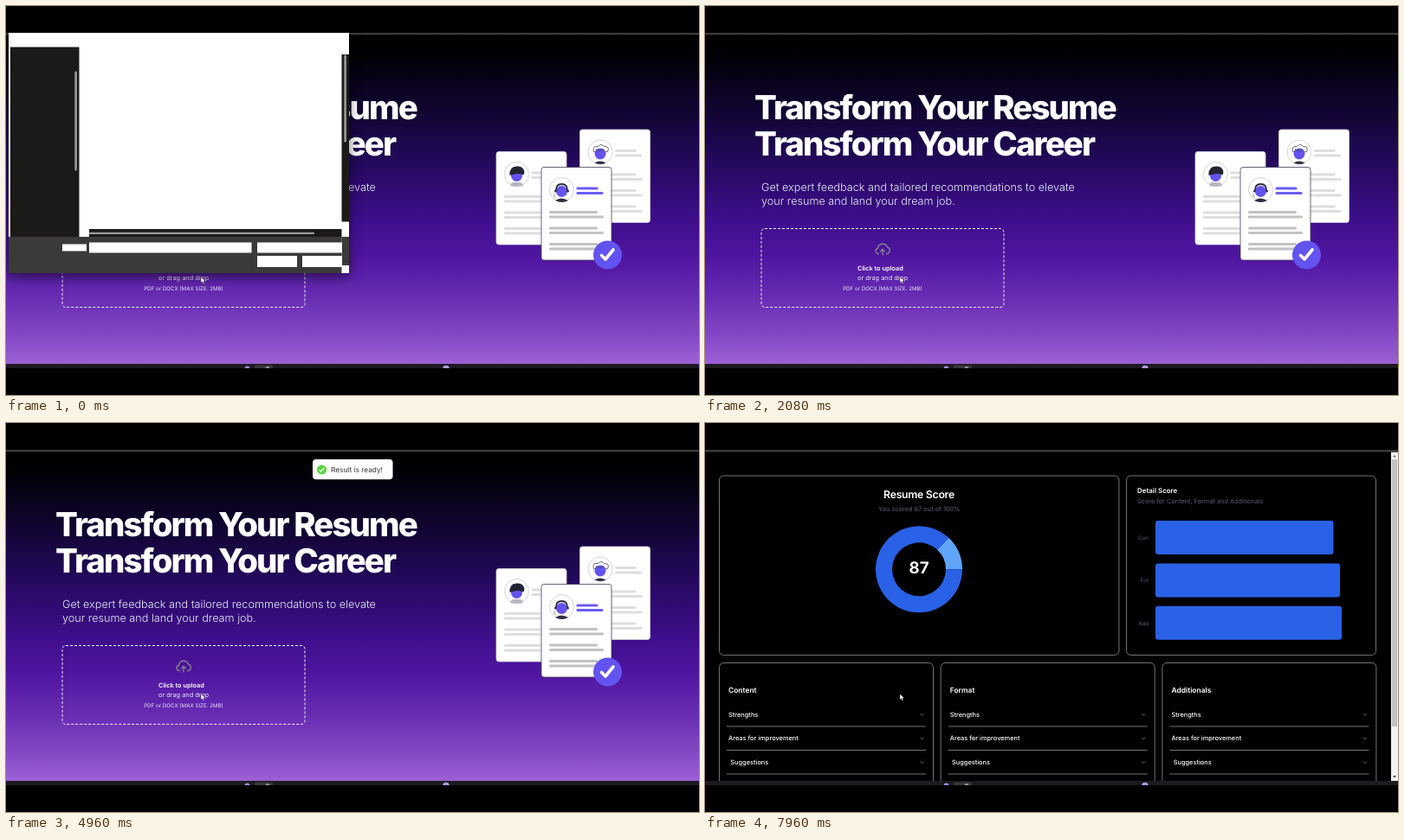
An HTML page that plays this animation: 800 px wide and 450 px high, repeating every 8000 ms.

```html
<!DOCTYPE html>
<html lang="en">
<head>
<meta charset="utf-8">
<title>Resume upload and score</title>
<style>
  html, body { margin: 0; width: 100%; height: 100%; overflow: hidden; background: #000; }
  svg { display: block; width: 100vw; height: 100vh; }
  text { font-family: Inter, sans-serif; text-rendering: geometricPrecision; white-space: pre; }
  .dialog text { font-family: "Open Sans", "Noto Sans", sans-serif; }
  .dialog { filter: drop-shadow(0 4px 7px rgba(0, 0, 0, .55)); }
</style>
</head>
<body>
<svg id="stage" viewBox="0 0 800 450"></svg>
<script>
const LOOP = 8000;
const LOADED = 120, CLOSED = 2080, TOAST = 2120, READY = 3520, SCORE = 5000;
const BARS = 5017, PIE = 5420;
const TYPED = [[0, ''], [1080, 'M'], [1240, 'Mu'],
  [1640, 'Muvek - New Resume 2024.docx'], [1800, 'Muvek - New Resume 2024.pdf']];

// Drawing helpers
const rect = (x, y, w, h, fill, more = '') =>
  `<rect x="${x}" y="${y}" width="${w}" height="${h}" fill="${fill}" ${more}/>`;
const box = (x, y, w, h, fill, stroke, r = 1) =>
  rect(x, y, w, h, fill, `rx="${r}" stroke="${stroke}" stroke-width=".8"`);
const disc = (x, y, r, fill, more = '') => `<circle cx="${x}" cy="${y}" r="${r}" fill="${fill}" ${more}/>`;
const line = (d, stroke, width = 1, more = '') =>
  `<path d="${d}" fill="none" stroke="${stroke}" stroke-width="${width}" ${more}/>`;
const shape = (d, fill) => `<path d="${d}" fill="${fill}"/>`;
const text = (x, y, s, size, fill = '#fff', weight = 400, more = '') =>
  `<text x="${x}" y="${y}" font-size="${size}" fill="${fill}" font-weight="${weight}" ${more}>${s}</text>`;
const group = (id, content, more = '') => `<g id="${id}" ${more}>${content}</g>`;
const middle = 'text-anchor="middle"';
const round = 'stroke-linecap="round" stroke-linejoin="round"';
const chevron = (x, y, color, s = 2) => line(`M${x - s} ${y - s / 2}l${s} ${s} ${s} ${-s}`, color, .8);

// Landing page
function resumeCard(dx, dy, front, portrait) {
  const rows = [238.5, 257, 275.5].map(y =>
    line(`M628.5 ${y}h53M628.5 ${y + 5.5}h60`, front ? '#c2c2c2' : '#dedede', 3.2, round)).join('');
  return `<g transform="translate(${dx} ${dy})">
    ${box(618, 186.5, 81, 107.5, '#fff', front ? '#3f3d56' : '#d5d2dc', 3)}
    ${disc(641.5, 212.5, 14, '#fff', 'stroke="#c9c9cf" stroke-width=".8"')}
    ${portrait}
    ${line('M660 211h22M660 216.5h28', front ? '#6c5cf5' : '#dedede', 3.2, round)}${rows}</g>`;
}

const face = disc(641.5, 214.5, 6.5, '#6353ee');
const capPortrait = shape('M634 226q1-4 4-4h7q3 0 4 4q-7 2-15 0z', '#b9b6c4') + face +
  shape('M633.5 214q-1-10 8-10.500q8-1 9 7l-1 3q-4-2-8-1.500z', '#252433');
const curlyPortrait = shape('M635 225q6-4 13 0q-6 3-13 0z', '#2f2e41') + face +
  line('M634 212q-2-7 5-6q4-4 7 0q7 0 4 6q-4 1-5-3q-5 4-8 0q0 4-3 3z', '#45435a', .8);
const headsetPortrait = shape('M634 225q7-5 15 0q-7 4-15 0z', '#2f2e41') + face +
  line('M635 213q0-7 6.500-7t6.500 7', '#2f2e41', 1.800) +
  disc(634.5, 214, 1.5, '#2f2e41') + disc(648.5, 214, 1.5, '#2f2e41') +
  line('M634 217q-3 3 1 5', '#77758a', .8);

const stops = [[0, '#000'], [7, '#020007'], [18, '#0c0325'], [31, '#1a0747'], [44, '#2b0a6b'],
  [57, '#3f0f8d'], [68, '#5016a1'], [81, '#6b2fb5'], [91, '#8347c4'], [100, '#9d60d5']];
const landing = rect(0, 33.5, 800, 380.5, 'url(#sky)') +
  text(57, 131, 'Transform Your Resume', 38.4, '#fff', 800, 'letter-spacing="-1.92"') +
  text(57, 172.5, 'Transform Your Career', 38.4, '#fff', 800, 'letter-spacing="-1.92"') +
  text(65, 213.7, 'Get expert feedback and tailored recommendations to elevate', 12.65, '#f0ebf8', 300) +
  text(65, 230.2, 'your resume and land your dream job.', 12.65, '#f0ebf8', 300) +
  rect(65, 257.5, 280, 91, 'none', 'rx="4" stroke="#eee" stroke-dasharray="3 2"') +
  line('M200.500 286.500h-.5a3.200 3.200 0 0 1-.5-6.300a5.700 5.700 0 0 1 11-1.200a3.900 3.900 0 0 1 0 7.500h-1' +
    'M205 288v-6.500m-2.400 2.300l2.400-2.500l2.400 2.500', '#85808c', 1.4, round) +
  text(176, 306, 'Click to upload', 7.35, '#fff', 600) +
  text(176, 316.5, 'or drag and drop', 7.35, '#ece6f5') +
  text(205, 329.2, 'PDF or DOCX (MAX SIZE. 2MB)', 6.2, '#ece6f5', 400, middle) +
  resumeCard(-52, -18, false, capPortrait) +
  resumeCard(44.5, -43.5, false, curlyPortrait) +
  resumeCard(0, 0, true, headsetPortrait) +
  disc(694.5, 288, 16.5, '#6353f0') +
  line('M687.500 288.500l4.500 4.500l9-11', '#fff', 3.6, round);

const toast = rect(354, 42, 92.5, 23.3, '#fff', 'rx="4"') +
  group('uploading', group('spinner', disc(364, 54, 2.8, 'none', 'stroke="#e0e0e0" stroke-width=".9"') +
    line('M364 51.200a2.800 2.800 0 0 1 2.800 2.800', '#616161', .9)) +
    text(375, 56.7, 'Uploading file...', 8.3, '#363636')) +
  group('ready', group('badge', disc(364.5, 54, 5.6, '#61d345') +
    line('M362 54.200l1.800 1.800l3.200-3.800', '#fff', 1.1, round)) +
    text(375, 56.7, 'Result is ready!', 8.3, '#363636'));

// File dialog
const small = (x, y, s, more = '') => text(x, y, s, 6.1, '#f2f2f2', 400, more);
const folder = (x, y) => shape(`M${x - 4} ${y - 3}h3l1 1h4v5.500h-8z`, '#e9a92b') +
  rect(x - 4, y - 1, 8, 4.3, '#ffd564', 'rx=".5"');
const pin = y => line(`M69 ${y + 2.5}l2-2m-1.500-1.500l3 3m-1.500-4l3 3`, '#aaa', 1);

const files = [
  ['k4nt-competitive-programming', '3/25/2024 1:53 AM'], ['ai-ass-iii', '6/30/2024 12:07 PM'],
  ['ai-farming', '6/29/2024 8:10 PM'], ['PlipPlap Assignment', '3/25/2024 8:59 AM'],
  ['Wendar-o Projects', '3/14/2024 12:52 PM'], ['hackatone', '3/24/2024 11:43 AM'],
  ['Quorvin', '3/14/2024 12:50 PM'], ['Italy', '3/13/2024 2:35 PM'],
  ['job-assignments', '3/28/2024 1:07 AM'], ['Tovik Tasks', '2/15/2024 3:49 PM'],
  ['GlowZi', '5/15/2024 10:20 AM'], ['My Documents', '7/25/2024 5:03 PM'],
  ['Quvela', '4/13/2024 9:27 PM']];
const fileRows = files.map(([name, date], i) => {
  const y = 71 + i * 15.42;
  return folder(101, y) + small(107, y + 2.2, name) + small(231.5, y + 2.2, date) +
    small(306, y + 2.2, 'File folder');
}).join('');

const placeIcons = [
  y => rect(21, y - 3, 8, 5, '#2f9be6', 'rx=".6"') + rect(23, y + 2.5, 4, 1, '#7fc4f2'),
  y => line(`M25 ${y - 4}v5m-2-2l2 2l2-2M22 ${y + 3.5}h6`, '#ddd', 1),
  y => rect(22, y - 4, 6.5, 8, '#8fb4d6', 'rx=".6"') + line(`M23.500 ${y - 1}h3.500m-3.500 2h3.500`, '#fff', .7),
  y => rect(21, y - 3.5, 8, 7, '#2f8fe0', 'rx=".8"') + shape(`M21.500 ${y + 3}l3-4l4 4z`, '#d7efff'),
  y => disc(25, y, 4, '#b779c9') + disc(25, y, 1.5, '#f6d6a0'),
  y => rect(21, y - 3.5, 8, 7, '#7a35c8', 'rx=".8"') + shape(`M24 ${y - 2}l3 2l-3 2z`, '#fff')];
const places = ['Desktop', 'Downloads', 'Documents', 'Pictures', 'Music', 'Videos',
  'Kestrino Desktop', 'Online Course Col', 'flexible-index'];
const placeRows = places.map((name, i) => {
  const y = 122.8 + i * 16.67, icon = placeIcons[i];
  return (icon ? icon(y) + pin(y) : folder(25, y)) + small(31, y + 2.2, name, 'clip-path="url(#side)"');
}).join('');
const branch = (y, name) => line(`M15.500 ${y - 2}l2 2l-2 2`, '#bbb', .8) + folder(29, y) + small(36, y + 2.2, name);

const bars = rect(79.3, 75.5, 2.6, 115, '#9b9b9b', 'rx="1.3"') +
  rect(390.3, 56.5, 2.6, 101, '#9b9b9b', 'rx="1.3"') +
  rect(96, 261.8, 260, 2.3, '#9b9b9b', 'rx="1.1"');
const grip = (x, y) => [[0, 0], [-2, 0], [0, -2], [-4, 0], [0, -4], [-2, -2]]
  .map(([a, b]) => rect(x + a, y + b, 1.2, 1.2, '#aaa')).join('');

const blank = rect(3, 31, 393, 278, '#fff') + rect(5, 47.5, 79.5, 219.5, '#1b1a19') +
  rect(387.5, 56, 8.5, 193.5, '#1b1a19') + rect(96, 258, 291.5, 9, '#1b1a19') +
  rect(3, 267, 384.5, 42, '#3a3a3a') + rect(387.5, 267, 8.5, 33, '#3a3a3a') +
  [[65, 275.5, 28, 8], [96, 273.5, 187.5, 12], [290, 273.5, 98, 12], [290, 289, 46, 13], [342, 289, 46, 13]]
    .map(r => rect(...r, '#fff')).join('') + bars;

const filled = rect(3, 31, 393, 236, '#191919') + rect(3, 267, 393, 42, '#333') +
  small(12, 41.5, 'Organize') + chevron(41.5, 39.5, '#ddd', 1.4) + small(58, 41.5, 'New folder') +
  rect(332.5, 35.5, 8, 7, '#ccc') + line('M333 38h7m-7 2.500h7', '#333', .6) + chevron(347.5, 39.5, '#ddd', 1.4) +
  rect(360.5, 35.5, 8.5, 7, '#e8e8e8') + rect(365, 36.3, 3.2, 5.4, '#2f8fe0') +
  disc(384, 39, 4, '#2b83d6') + text(384, 41.3, '?', 6.2, '#fff', 700, middle) +
  line('M228.500 47v14M303.500 47v14M366.500 47v14M383.500 47v14', '#454545', .8) +
  line('M161 49l2-2l2 2', '#aaa', .7) +
  small(102, 56.5, 'Name') + small(231.5, 56.5, 'Date modified') + small(306, 56.5, 'Type') + small(369, 56.5, 'Size') +
  rect(5, 48, 72, 15.5, '#343434') + chevron(12, 56, '#bbb') + disc(25, 56, 3.6, '#2a8fe0') +
  small(31, 58.2, 'Nimbodex - Personal', 'clip-path="url(#side)"') +
  branch(72.5, 'Documents') + branch(89.3, 'Pictures') + line('M8 105.500h64', '#444', .8) +
  placeRows + fileRows + bars +
  small(93, 282, 'File name:', 'text-anchor="end"') +
  box(96, 274, 187.5, 12, '#262626', '#a5a5a5') + chevron(279, 280, '#ccc', 1.7) +
  '<text id="typed" x="97.500" y="282.200" font-size="6.100" fill="#fff"></text>' +
  box(290, 274, 97.5, 12, '#262626', '#858585') + small(292, 282.2, 'All Files (*.*)') + chevron(383, 280, '#ccc', 1.7) +
  box(290.3, 289.5, 45.4, 13, '#303030', '#d5d5d5') + small(313, 298.2, 'Open', middle) +
  box(342.3, 289.5, 45, 13, '#303030', '#858585') + small(364.8, 298.2, 'Cancel', middle) +
  grip(393, 306.5) +
  group('suggest', box(96.5, 285.8, 176.5, 28, '#2b2b2b', '#555', 0) +
    rect(97, 286.2, 175.5, 10, '#4d4d4d', 'id="pick"') +
    small(99.5, 292, 'Muvek - New Resume 2024.docx') + small(99.5, 301.5, 'Muvek - New Resume 2024.pdf') +
    grip(270.5, 311.5));

// Score page
const muted = '#5f5a70', border = '#909090';
const panel = (x, y, w, h) => box(x, y, w, h, '#000', border, 5);
const sections = ['Content', 'Format', 'Additionals'].map((title, i) => {
  const items = [['Strengths', 27], ['Areas for improvement', 27], ['Suggestions', 29.3]];
  return `<g transform="translate(${i * 255.7} 0)">` + panel(16.5, 277.5, 247, 160) +
    text(27, 311.6, title, 8.45, '#fff', 600) +
    items.map(([name, x], k) => text(x, 339.7 + k * 27.6, name, 7.4, '#fff', 500) +
      chevron(250.5, 337.3 + k * 27.6, '#858585') +
      line(`M25 ${351 + k * 27.5}h230`, border, .8)).join('') + '</g>';
}).join('');
const scoreBars = [['Con', 205.5], ['For', 213], ['Add', 215]];
const score = rect(0, 33.5, 800, 381, '#000') + panel(16.5, 61, 461.5, 207.5) + panel(486.5, 61, 288, 207.5) +
  text(247, 86.7, 'Resume Score', 12.3, '#fff', 600, middle + ' letter-spacing="-.3"') +
  text(247.3, 101.5, 'You scored 87 out of 100%', 7.4, muted, 400, middle) +
  '<path id="rest" fill="#60a5fa"/><path id="main" fill="#2962e6"/>' +
  text(247, 174.2, '87', 18.7, '#fff', 700, middle) +
  text(499, 80.5, 'Detail Score', 7.95, '#fff', 600) +
  text(499, 93.2, 'Score for Content, Format and Additionals', 7.35, muted) +
  scoreBars.map(([name], i) => text(512, 135 + i * 49.4, name, 6.2, muted, 400, 'text-anchor="end"') +
    rect(520, 113 + i * 49.4, 0, 39, '#2962e6', `rx="3" id="bar${i}"`)).join('') + sections +
  rect(792, 33.5, 8, 380.5, '#f1f1f1') + rect(793, 42, 6, 309, '#c1c1c1') +
  shape('M794 39.500l2-2.500l2 2.500z', '#777') + shape('M794 408l2 2.500l2-2.500z', '#444');

document.getElementById('stage').innerHTML = `<defs>
  <linearGradient id="sky" x2="0" y2="1">${stops.map(([p, c]) => `<stop offset="${p}%" stop-color="${c}"/>`).join('')}</linearGradient>
  <clipPath id="page"><path d="M0 33.500h800v380.500h-800z"/></clipPath>
  <clipPath id="side"><path d="M5 47h71.500v220h-71.500z"/></clipPath>
  <clipPath id="taskbar"><path d="M0 414h800v5h-800z"/></clipPath></defs>` +
  rect(0, 0, 800, 450, '#000') + rect(0, 31, 800, 2.7, '#3b3a3e') +
  group('landing', landing) +
  group('toastArea', group('toast', toast), 'clip-path="url(#page)"') +
  group('score', score, 'clip-path="url(#page)"') +
  group('tasks', rect(0, 414, 800, 5, '#1d1a20') + rect(287, 415.5, 21, 4, '#38363b', 'rx="1"') +
    disc(278.5, 419.5, 3, '#a78be0') + disc(302, 419.5, 2.5, '#99959f') + disc(508, 419.5, 3.8, '#b49be0'),
    'clip-path="url(#taskbar)"') +
  group('dialog', group('blank', blank) + group('filled', filled), 'class="dialog"') +
  `<path d="M225 313.500v6.800l1.600-1.500l1.100 2.500l1.200-.5l-1.100-2.500h2.200z" fill="#fff" stroke="#222" stroke-width=".4"/>`;

// Motion
const $ = id => document.getElementById(id);
const show = (id, on) => { $(id).style.display = on ? '' : 'none'; };
const clamp = v => Math.min(1, Math.max(0, v));

function bezier(x1, y1, x2, y2) {
  const at = (a, b, s) => 3 * (1 - s) ** 2 * s * a + 3 * (1 - s) * s * s * b + s ** 3;
  return x => {
    let low = 0, high = 1;
    for (let i = 0; i < 24; i++) {
      const s = (low + high) / 2;
      if (at(x1, x2, s) < x) low = s; else high = s;
    }
    return at(y1, y2, high);
  };
}
const ease = bezier(.25, .1, .25, 1);
const toastEase = bezier(.21, 1.02, .73, 1);

function ring(from, to) {
  if (to - from < .01) return '';
  const point = (r, deg) => {
    const a = deg * Math.PI / 180;
    return `${247 + r * Math.cos(a)} ${169.3 - r * Math.sin(a)}`;
  };
  const large = to - from > 180 ? 1 : 0;
  return `M${point(50, from)}A50 50 0 ${large} 0 ${point(50, to)}L${point(31, to)}A31 31 0 ${large} 1 ${point(31, from)}Z`;
}

function render(t) {
  show('dialog', t < CLOSED);
  show('blank', t < LOADED);
  show('filled', t >= LOADED);
  const step = TYPED.filter(([at]) => t >= at).length - 1;
  $('typed').textContent = TYPED[step][1];
  show('suggest', step > 0);
  show('pick', step > 2);
  $('pick').setAttribute('y', step === 4 ? 295.8 : 286.2);

  show('landing', t < SCORE);
  show('toastArea', t >= TOAST && t < SCORE);
  const enter = toastEase(clamp((t - TOAST) / 350)), scale = .6 + .4 * enter;
  $('toast').setAttribute('transform',
    `translate(400.25 ${53.6 - 46.6 * (1 - enter)}) scale(${scale}) translate(-400.25 -53.6)`);
  $('toast').setAttribute('opacity', .5 + .5 * enter);
  show('uploading', t < READY);
  show('ready', t >= READY);
  $('spinner').setAttribute('transform', `rotate(${(t - TOAST) * .36} 364 54)`);
  const pop = ease(clamp((t - READY) / 300));
  $('badge').setAttribute('transform', `translate(364.5 54) scale(${pop}) translate(-364.5 -54)`);

  show('score', t >= SCORE);
  const grow = ease(clamp((t - BARS) / 400));
  scoreBars.forEach(([, width], i) => $('bar' + i).setAttribute('width', width * grow));
  const sweep = 360 * ease(clamp((t - PIE) / 1500));
  $('rest').setAttribute('d', ring(0, sweep * .13));
  $('main').setAttribute('d', ring(sweep * .13, sweep));
}

function frame() {
  render(performance.now() % LOOP);
  requestAnimationFrame(frame);
}
frame();
</script>
</body>
</html>
```
